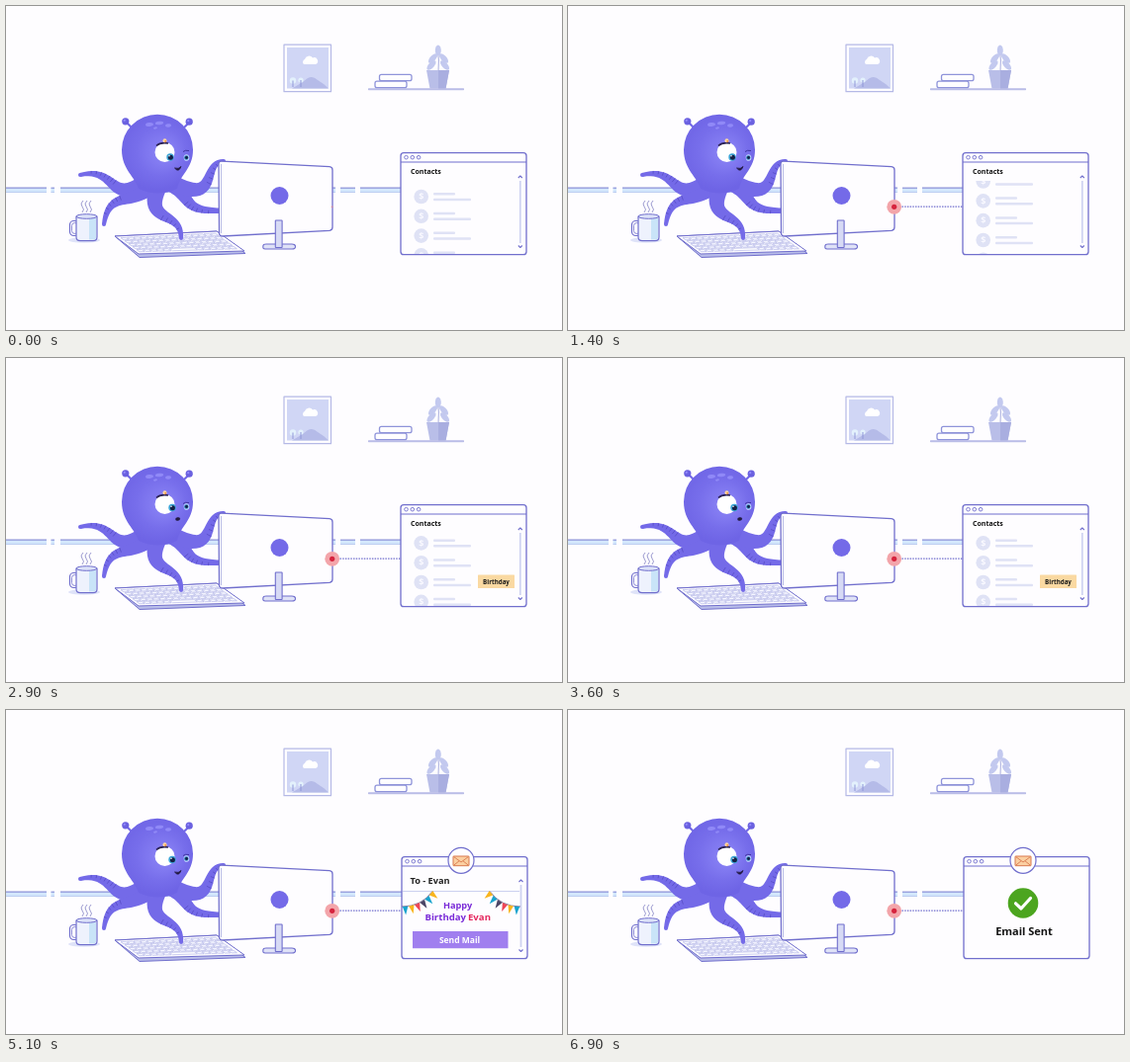
Animation of 562 by 328 pixels, one loop 7000 ms. Source, as an HTML page with a canvas:

```html
<!DOCTYPE html>
<html lang="en">
<head>
<meta charset="utf-8">
<title>Birthday mail</title>
<style>
html, body { margin: 0; width: 100%; height: 100%; overflow: hidden; background: #fefdff; }
canvas { display: block; }
</style>
</head>
<body>
<canvas id="stage" width="562" height="328"></canvas>
<script>
const ctx = document.getElementById('stage').getContext('2d');
const LOOP = 7000, STEP = 100;
const MAIL_AT = 3700, SENT_AT = 6000;
const INK = '#716fcd', PALE = '#b5b9e6', BODY = '#746ae8', NAME = 'Evan';
const clamp = v => Math.max(0, Math.min(1, v));
const progress = (t, from, to) => clamp((t - from) / (to - from));

function paint(fill, stroke, width = 1) {
  if (fill) { ctx.fillStyle = fill; ctx.fill(); }
  if (stroke) { ctx.strokeStyle = stroke; ctx.lineWidth = width; ctx.stroke(); }
}
function circle(x, y, r, fill, stroke, width) {
  ctx.beginPath();
  ctx.arc(x, y, r, 0, Math.PI * 2);
  paint(fill, stroke, width);
}
function ellipse(x, y, rx, ry, fill, angle = 0) {
  ctx.beginPath();
  ctx.ellipse(x, y, rx, ry, angle, 0, Math.PI * 2);
  paint(fill);
}
function box(x, y, w, h, r, fill, stroke, width) {
  ctx.beginPath();
  ctx.roundRect(x, y, w, h, r);
  paint(fill, stroke, width);
}
function poly(points, fill, stroke, width) {
  ctx.beginPath();
  points.forEach(p => ctx.lineTo(...p));
  ctx.closePath();
  paint(fill, stroke, width);
}
function path(d, fill, stroke, width = 1) {
  const shape = new Path2D(d);
  if (fill) { ctx.fillStyle = fill; ctx.fill(shape); }
  if (stroke) { ctx.strokeStyle = stroke; ctx.lineWidth = width; ctx.stroke(shape); }
}
function text(str, x, y, size, color, align = 'left') {
  ctx.font = `bold ${size}px "Open Sans", sans-serif`;
  ctx.textAlign = align;
  ctx.fillStyle = color;
  ctx.fillText(str, x, y);
}

function drawWall() {
  for (const [from, to] of [[0, 41], [45.5, 49], [55, 333], [338, 353], [358, 400]]) {
    box(from, 184, to - from, 5, 0, '#d3e7fc');
    box(from, 183.6, to - from, 1.2, 0, '#8b91d8');
    box(from, 188.2, to - from, 0.8, 0, '#b5c4ee');
  }
}

function drawPicture() {
  box(281, 39.2, 47.5, 47.5, 0, '#fefdff', PALE, 1.2);
  box(284, 42, 42, 41.5, 0, '#d0d6f5');
  path('M289 83.5Q299 78 305 73Q310 70 315 75Q322 79 326 83.5Z', '#b5bbe8');
  path('M301 59a3 3 0 0 1 1-5a4.5 4.5 0 0 1 8-1.5a3.2 3.2 0 0 1 3 6.5Z', '#fff');
  for (const [x, y, r] of [[290, 75.5, 3.2], [298, 75, 2.6]]) {
    circle(x, y, r, '#e3f1fc');
    path(`M${x} ${y}V82`, null, '#8f97d8', 1);
  }
}

function drawShelf() {
  box(366, 83.2, 97, 2, 0.6, '#b9bce7');
  box(377.5, 69.3, 32.5, 6.4, 2, '#fefdff', '#8f94da', 1.3);
  box(373, 76.2, 32, 6.5, 2, '#fefdff', '#8f94da', 1.3);
  path('M437 66Q438 55 436.5 44', null, '#a9aede', 1);
  ellipse(436.8, 45, 3, 5.4, '#c3c9ef');
  for (const [y, side, reach] of [[53, -1, 5.5], [53, 1, 5.5], [60, -1, 7], [60, 1, 6.5]])
    ellipse(437 + side * reach, y, 2.8, 6, '#c3c9ef', side * -0.75);
  poly([[425, 65], [448, 65], [444.5, 83.5], [428.5, 83.5]], '#b9bee8');
  poly([[437, 65], [448, 65], [444.5, 83.5], [437, 83.5]], '#a9aee0');
}

function drawMug() {
  ellipse(79, 237, 16, 2.8, '#dfe3f8');
  box(64.5, 217.5, 9, 15, 4, null, INK, 1.2);
  box(66.5, 219.5, 6, 11, 3, '#fefdff', INK, 0.8);
  path('M71 213V234Q71 237.6 75 237.6H88Q92 237.6 92 234V213Z', '#eef2fd', INK, 1.2);
  path('M84 215H91V234Q91 236.6 88 236.6H84Z', '#c9e4f8');
  ctx.beginPath();
  ctx.ellipse(81.5, 213, 10.5, 2.3, 0, 0, Math.PI * 2);
  paint('#dbe1f8', INK, 1);
  for (const x of [77, 81, 85])
    path(`M${x} 209q3 -3 0 -6q-2.5 -3 1 -6`, null, '#8583c4', 0.8);
}

function drawKeyboard() {
  const at = (u, v) => {
    const left = [110 + 24 * v, 233 + 18 * v];
    const right = [213 + 28 * v, 228 + 20 * v];
    return [left[0] + (right[0] - left[0]) * u, left[1] + (right[1] - left[1]) * u];
  };
  const corners = [at(0, 0), at(1, 0), at(1, 1), at(0, 1)];
  poly([at(0, 0), at(1, 0), [242, 250.5], [135, 254.5]], '#b9bde9', INK, 1);
  poly(corners, '#fefdff', INK, 1);
  const rows = 5, cols = 15;
  for (let r = 0; r < rows; r++) {
    const v0 = 0.1 + r * 0.165, v1 = v0 + 0.12;
    for (let c = 0; c < cols; c++) {
      if (r === 4 && c > 4 && c < 9) continue;
      const u0 = 0.035 + c * 0.0625, u1 = u0 + 0.05;
      poly([at(u0, v0), at(u1, v0), at(u1, v1), at(u0, v1)], '#f6f7ff', '#b0b4e6', 0.65);
    }
  }
  poly([at(0.35, 0.76), at(0.585, 0.76), at(0.585, 0.88), at(0.35, 0.88)], '#fff', '#b0b4e6', 0.65);
}

// Tapered limb along a cubic curve; ticks mark the ridges near its end.
function tentacle([a, b, c, d], startWidth, endWidth, ticks = 0) {
  const sample = s => {
    const q = 1 - s;
    const pos = i => q * q * q * a[i] + 3 * q * q * s * b[i] + 3 * q * s * s * c[i] + s * s * s * d[i];
    const vel = i => q * q * (b[i] - a[i]) + 2 * q * s * (c[i] - b[i]) + s * s * (d[i] - c[i]);
    const len = Math.hypot(vel(0), vel(1));
    const half = (startWidth + (endWidth - startWidth) * s) / 2;
    const nx = -vel(1) / len * half, ny = vel(0) / len * half;
    return { x: pos(0), y: pos(1), nx, ny };
  };
  const left = [], right = [];
  for (let i = 0; i <= 24; i++) {
    const p = sample(i / 24);
    left.push([p.x + p.nx, p.y + p.ny]);
    right.unshift([p.x - p.nx, p.y - p.ny]);
  }
  poly([...left, ...right], BODY);
  circle(d[0], d[1], endWidth / 2, BODY);
  for (let i = 0; i < ticks; i++) {
    const p = sample(0.5 + i * 0.45 / ticks);
    path(`M${p.x} ${p.y}L${p.x + p.nx} ${p.y + p.ny}`, null, '#564cc4', 0.8);
  }
}

function drawFace(t) {
  const worried = t >= 2500 && t < MAIL_AT;
  const lookUp = t >= 2500;
  const px = lookUp ? 168 : 166, py = lookUp ? 151.5 : 153;
  circle(160.5, 148, 10, '#fff');
  circle(px, py, 3.7, '#3ba5d6');
  circle(px + 0.4, py + 0.2, 2.5, '#142044');
  circle(px - 1, py - 1.3, 0.8, '#fff');
  path('M152 141.5Q156 137.6 164 139', null, '#292052', 1.6);
  circle(160.5, 136.3, 2, '#ffd7a0');
  circle(161.2, 137, 1, '#ef8b42');
  const sideY = lookUp ? 150.5 : 153.5;
  ellipse(182.5, sideY, 2.8, 3.3, '#c9d7ff', -0.15);
  circle(182.3, sideY, 2.2, '#2b81b9');
  circle(182.5, sideY, 1.4, '#142044');
  path('M179 147.5Q181 145.5 185 146.5', null, '#4035a0', 1);
  if (worried) {
    ellipse(173.6, 163, 2.4, 1.8, '#21193f', -0.2);
  } else {
    path('M170.5 164Q174.5 169 177 162.5Q174.5 165.5 170.5 164Z', '#21193f', '#21193f', 0.8);
  }
}

function drawOctopus(t) {
  tentacle([[142, 178], [104, 203], [112, 162], [75, 171]], 17, 4, 7);
  tentacle([[148, 182], [124, 203], [104, 187], [99, 221]], 16, 4, 6);
  tentacle([[155, 180], [137, 222], [177, 205], [177, 235]], 18, 4, 5);
  tentacle([[163, 178], [190, 191], [174, 209], [219, 207]], 17, 5, 6);
  tentacle([[164, 177], [217, 205], [196, 159], [220, 157]], 17, 4, 5);

  path('M122 118L129 125M185 118L178 125', null, BODY, 2.2);
  circle(120.8, 116.8, 3.6, '#6b61e0');
  circle(185.2, 117.2, 3.6, '#6b61e0');
  circle(119.8, 115.8, 1.1, '#928aff');
  circle(184.2, 116.2, 1.1, '#928aff');

  const shade = ctx.createRadialGradient(161, 149, 6, 153, 146, 40);
  shade.addColorStop(0, '#8881f4');
  shade.addColorStop(0.55, '#776eeb');
  shade.addColorStop(1, '#6e64e5');
  path('M117 145.5A36 35.8 0 0 1 189 145.5C189 165 176 170 173 185Q154 194 134 185C131 173 117 166 117 145.5Z', shade);
  for (const [x, y, rx, ry] of [[145, 120, 4, 2], [155, 118.5, 4.2, 1.8], [164, 121, 3, 1.7], [151, 123.5, 2, 1.1]])
    ellipse(x, y, rx, ry, '#9089f7', -0.1);
  drawFace(t);
}

function drawMonitor() {
  path('M218 157.2L327 162.7Q330 163 330 166V224Q330 227 327 227.3L219 233Q215.5 233 215.5 230L215 160Q215 157 218 157.2Z', '#fefdff', INK, 1.3);
  path('M217.5 160V230', null, '#aaaee0', 0.8);
  circle(276.5, 192, 9, BODY);
  path('M260 242.5Q260 241 263 241H289Q292 241 292.5 243Q293 246 289 246H262Q259 246 260 242.5Z', '#dfe2f7', INK, 1.1);
  box(272.3, 217, 6.8, 27.5, 0.5, '#d7daf5', INK, 1.1);
}

function drawConnection(age) {
  const scale = progress(age, -70, 300);
  ctx.globalAlpha = 0.25 + 0.75 * scale;
  circle(329.7, 203.3, 7.4 * scale, '#f3a5aa');
  circle(329.7, 203.3, 2.6 * scale, '#d6243e');
  ctx.globalAlpha = 1;
  const end = 337 + 62 * progress(age, 130, 700);
  for (let x = 337.5; x < end; x += 2.7) box(x, 202.5, 1.5, 1.3, 0, INK);
}

function drawWindow(x) {
  box(x, 148.7, 127, 103, 3, '#fefdff', INK, 1.3);
  path(`M${x} 158H${x + 127}`, null, INK, 1.1);
  for (let i = 0; i < 3; i++) circle(x + 5.5 + i * 6.3, 153.2, 1.8, '#fefdff', INK, 0.9);
}
function drawScrollbar(x) {
  path(`M${x} 177V240`, null, '#cfd3f1', 1.8);
  path(`M${x - 2} 174l2 -2l2 2M${x - 2} 242.5l2 2l2 -2`, null, INK, 1.1);
}

function drawContacts(t) {
  drawWindow(399);
  text('Contacts', 409, 170, 7, '#111');
  const scroll = 65 * progress(t, 240, 2380);
  ctx.save();
  ctx.beginPath();
  ctx.rect(400, 177, 116, 74);
  ctx.clip();
  for (let i = 0; i < 8; i++) {
    const y = 193 + i * 19.8 - scroll;
    circle(419.7, y, 7.3, '#dfe2f5');
    text('$', 419.7, y + 3.2, 9, '#f9f9ff', 'center');
    box(432, y - 4, 22, 2.5, 1, '#dfe2f5');
    box(432, y + 1.7, 38, 2.5, 1, '#dfe2f5');
  }
  ctx.restore();
  drawScrollbar(519.8);

  const shown = progress(t, 2400, 2800);
  if (shown > 0) {
    ctx.save();
    ctx.globalAlpha = shown;
    ctx.translate(495.5, 226.5);
    ctx.scale(0.7 + 0.3 * shown, 0.7 + 0.3 * shown);
    box(-18.5, -7, 37, 13.5, 0.5, '#fad9a2');
    text('Birthday', 0, 2.4, 6.2, '#171717', 'center');
    ctx.restore();
  }
}

function drawEnvelope() {
  circle(460, 152.3, 13, '#fefdff', INK, 1.2);
  box(452, 148, 16, 9.7, 0.5, '#fbd0a2', '#d9794e', 1);
  path('M452.5 148.5L460 154L467.5 148.5M452.5 157.3L458 152.8M467.5 157.3L462 152.8', null, '#d9794e', 0.9);
}

function drawBunting(mirror) {
  const colors = ['#f9b51d', '#18a4ce', '#4b4566', '#ee4656', '#f9b51d', '#18a4ce'];
  ctx.save();
  ctx.translate(460, 0);
  ctx.scale(mirror ? -1 : 1, 1);
  path('M-29 183.5Q-40 199 -60 199', null, '#67608b', 0.8);
  colors.forEach((color, i) => {
    const s = 0.06 + i * 0.17, q = 1 - s;
    const x = -29 * q * q - 80 * q * s - 60 * s * s;
    const y = 183.5 * q * q + 398 * q * s + 199 * s * s;
    const angle = Math.atan2(15.5 * q, -11 * q - 20 * s) + Math.PI;
    ctx.save();
    ctx.translate(x, y);
    ctx.rotate(angle);
    poly([[-2.8, 0], [2.8, 0], [0, 8.6]], color);
    ctx.restore();
  });
  ctx.restore();
}

function drawMail(t) {
  drawWindow(400);
  text(`To - ${NAME}`, 408.5, 175.5, 9.2, '#222');
  path('M401 183.5H519', null, '#cbd0ef', 1);
  drawScrollbar(520.5);
  drawBunting(false);
  drawBunting(true);
  text('Happy', 456.5, 200.8, 9.2, '#7a2bd8', 'center');
  text('Birthday', 423.5, 212.5, 9.6, '#7a2bd8');
  text(NAME, 467, 212.5, 9.6, '#e5285f');
  ctx.globalAlpha = 1 - 0.63 * progress(t, 4900, 5800);
  box(411, 224, 96.5, 17.2, 0, '#916bed');
  ctx.globalAlpha = 1;
  text('Send Mail', 458.5, 235.5, 8.5, '#fff', 'center');
  drawEnvelope();
}

function drawSent() {
  drawWindow(400);
  drawEnvelope();
  circle(460, 195.5, 15.3, '#4ca51f');
  ctx.lineCap = ctx.lineJoin = 'round';
  path('M452.5 195.8L458 201L467.5 190.5', null, '#fff', 3.2);
  ctx.lineCap = 'butt';
  text('Email Sent', 461, 228, 11, '#141414', 'center');
}

function render(t) {
  ctx.lineJoin = 'round';
  ctx.fillStyle = '#fefdff';
  ctx.fillRect(0, 0, 562, 328);
  drawWall();
  drawPicture();
  drawShelf();
  drawMug();
  drawKeyboard();
  drawOctopus(t);
  drawMonitor();
  const sceneStart = t >= SENT_AT ? SENT_AT : t >= MAIL_AT ? MAIL_AT : 0;
  drawConnection(t - sceneStart);
  if (sceneStart === SENT_AT) drawSent();
  else if (sceneStart === MAIL_AT) drawMail(t);
  else drawContacts(t);
}

const start = performance.now();
function frame() {
  const t = (performance.now() - start) % LOOP;
  render(Math.floor(t / STEP) * STEP);
  requestAnimationFrame(frame);
}
frame();
</script>
</body>
</html>
```
